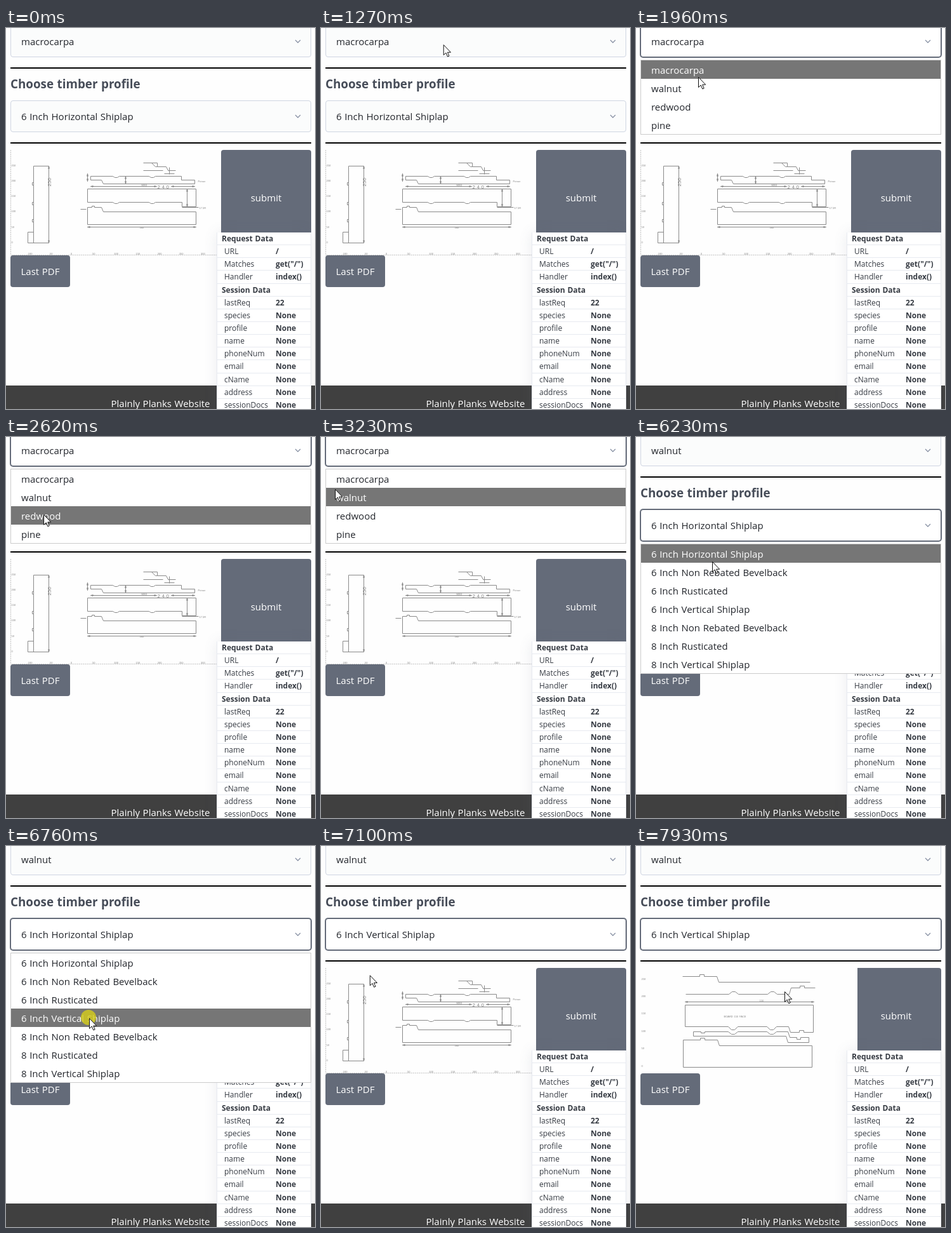
An HTML page that plays this animation: 487x600 px, repeating every 7.99 s.

```html
<!DOCTYPE html>
<html lang="en">
<head>
<meta charset="utf-8">
<title>Timber profile picker</title>
<style>
  html, body { margin: 0; width: 100%; height: 100%; overflow: hidden; background: #fefefe; }
  body { position: relative; font: 15px/30px "Open Sans", "Noto Sans", sans-serif; word-spacing: .7px; color: #23262c; }
  body > * { position: absolute; box-sizing: border-box; }
  .hidden { visibility: hidden; }
  hr { left: 7px; width: 474px; height: 2px; margin: 0; border: 0; background: #000; }
  h2 { left: 7px; top: 73px; margin: 0; font-size: 18.8px; color: #474d59; }

  .select { left: 7px; width: 474px; height: 50px; padding-left: 16px; line-height: 48px;
    border: 1px solid #cfd5e2; border-radius: 4px; background: #fbfcfc; }
  .select.focus { border-color: #646b79; box-shadow: 0 0 0 1px #646b79; background: #fff; }
  .select svg { position: absolute; right: 14px; top: 20px; fill: none; stroke: #8891a4; stroke-width: 1.3; }

  .menu { left: 7px; width: 474px; margin: 0; padding: 0; list-style: none; z-index: 3;
    border: 1px solid #ccc; background: #fff; }
  .menu li { height: 29px; padding-left: 16px; }
  .menu li.lit { background: #767676; color: #fff; }

  .button { border-radius: 4px; background: #646b79; color: #fff; text-align: center; }
  .drawing { left: 7px; top: 192px; height: 166px; fill: none; stroke: #8a8a8a; }
  .drawing text { fill: #808080; stroke: none; font: 4px "Liberation Sans", sans-serif; }
  .drawing .big { font-size: 8px; }
  .drawing .wide { letter-spacing: 2.5px; }

  .panel { left: 332px; top: 322px; width: 149px; z-index: 2; border: 1px solid #e7eaf0; border-top: 0; background: #fff;
    box-shadow: 0 0 20px rgba(90, 100, 120, .12); font-size: 12px; line-height: 20.15px; color: #373c44; }
  .panel div { box-sizing: border-box; height: 20.15px; padding-left: 11px; border-bottom: 1px solid #e7eaf0; display: flex; }
  .panel span { width: 81px; }
  .panel .head { padding-left: 7px; }

  footer { left: 0; top: 563px; width: 100%; height: 60px; line-height: 57px; text-align: center; background: #404040; color: #fff; }
  #press { left: -13px; top: -13px; width: 24px; height: 24px; border-radius: 50%; background: rgba(212, 204, 28, .82); z-index: 4; }
  #cursor { left: 0; top: 0; z-index: 5; overflow: visible; }
</style>
</head>
<body>
<div class="select" id="species" style="top:-4px"><span></span></div>
<hr style="top:62px">
<h2>Choose timber profile</h2>
<div class="select" id="profile" style="top:114px"><span></span></div>
<hr style="top:180px">

<div class="button" style="left:339px;top:192px;width:142px;height:150px;line-height:151px">submit</div>
<div class="button" style="left:7px;top:358px;width:94px;height:50px;line-height:51px">Last PDF</div>
<svg class="drawing" id="horizontal" width="326" viewBox="6.5 191.5 326 166"></svg>
<svg class="drawing" id="vertical" width="342" viewBox="6.5 191.5 342 166" style="background:#fefefe"></svg>

<div class="panel" id="panel"></div>
<footer>Plainly Planks Website</footer>
<ul class="menu" id="speciesMenu" style="top:50px"></ul>
<ul class="menu" id="profileMenu" style="top:168px"></ul>
<div id="press"></div>
<svg id="cursor" width="13" height="20">
  <path d="M.5 .5v16l3.700-3.500l2.600 6l2.400-1l-2.500-5.800h5z" fill="#fff" stroke="#111"/>
</svg>

<script>
const LOOP = 7990, ENTER = 600, REDRAW = 7780, ROW = 29;
const $ = id => document.getElementById(id);

const speciesNames = ['macrocarpa', 'walnut', 'redwood', 'pine'];
const profileNames = ['6 Inch Horizontal Shiplap', '6 Inch Non Rebated Bevelback', '6 Inch Rusticated',
  '6 Inch Vertical Shiplap', '8 Inch Non Rebated Bevelback', '8 Inch Rusticated', '8 Inch Vertical Shiplap'];

// Mouse presses; each takes effect on release
const presses = {
  openSpecies: { down: 1400, up: 1540 },
  pickSpecies: { down: 3890, up: 3960 },
  openProfile: { down: 5700, up: 5800 },
  pickProfile: { down: 6640, up: 6900 }
};

// Stops of the pointer: time, x, y
const stops = [
  [ENTER, 256, 0], [1400, 188, 28], [1960, 98, 77], [2500, 62, 125], [3230, 22, 82], [3890, 33, 95],
  [5090, 23, 13], [5700, 122, 139], [6230, 120, 196], [6430, 126, 281], [6690, 131, 271],
  [6900, 131, 271], [7350, 2, 110], [7930, 234, 229]
];

const ease = k => k * k * (3 - 2 * k);
const between = (t, a, b) => t >= a && t < b;
const show = (el, on) => el.classList.toggle('hidden', !on);
const place = (el, [x, y]) => { el.style.transform = `translate(${x}px, ${y}px)`; };

function pointerAt(t) {
  const i = stops.findIndex(stop => stop[0] > t);
  const [t1, x1, y1] = stops.at(i);
  if (i < 1) return [x1, y1];
  const [t0, x0, y0] = stops[i - 1];
  const k = ease((t - t0) / (t1 - t0));
  return [x0 + (x1 - x0) * k, y0 + (y1 - y0) * k];
}

function drawMenu(menu, open, y) {
  show(menu, open);
  const row = Math.max(0, Math.floor((y - menu.offsetTop - 1) / ROW));
  [...menu.children].forEach((item, i) => item.classList.toggle('lit', i === row));
}

function drawSelect(select, label, focused) {
  select.firstChild.textContent = label;
  select.classList.toggle('focus', focused);
}

function draw(t) {
  const { openSpecies, pickSpecies, openProfile, pickProfile } = presses;
  const pointer = pointerAt(t);
  place($('cursor'), pointer);
  place($('press'), pointer);
  show($('cursor'), t >= ENTER);
  show($('press'), Object.values(presses).some(p => between(t, p.down, p.up)));

  drawSelect($('species'), speciesNames[t < pickSpecies.up ? 0 : 1], between(t, openSpecies.down, openProfile.down));
  drawSelect($('profile'), profileNames[t < pickProfile.up ? 0 : 3], t >= openProfile.down);
  drawMenu($('speciesMenu'), between(t, openSpecies.up, pickSpecies.up), pointer[1]);
  drawMenu($('profileMenu'), between(t, openProfile.up, pickProfile.up), pointer[1]);
  show($('horizontal'), t < REDRAW);
  show($('vertical'), t >= REDRAW);
}

// Helpers for the plans
const line = d => `<path d="${d}"/>`;
const text = (x, y, s, cls = '') => `<text x="${x}" y="${y}" class="${cls}">${s}</text>`;
const range = (n, f) => Array.from({ length: n }, (_, i) => f(i)).join('');
const sideRuler = (y, gap) => range(6, i => text(8, y + i * gap, 250 - i * 50));
const groove = (slope, flat, depth) => `l${slope} ${depth}h${flat}l${slope} ${-depth}`;
const across = (x, y, w) => line(`M${x} ${y}h${w}m-4-1l4 1l-4 1M${x + 4} ${y - 1}l-4 1l4 1`);
const down = (x, y, h) => line(`M${x} ${y}v${h}m-1-4l1 4l1-4M${x - 1} ${y + 4}l1-4l1 4`);

function horizontalPlan() {
  const cut = groove(3, 4, 2);
  const cuts = lead => `h${lead}${cut}h47${cut}`;
  const nick = 'v-4h-2v-4h2';
  return sideRuler(217, 24.3) + range(9, i => text(33 + i * 34.2, 356, i * 50 - 100)) +
    '<path d="M7 192V357H333" stroke-dasharray="1 2"/>' +
    line(`M67 217H43V338M43 321H34V338H67M43 251${nick}M43 282${nick}M43 309${nick}`) + down(67, 217, 121) +
    '<g transform="translate(70 249) rotate(-90)">' + text(0, 0, 250, 'big') + '</g>' +
    line('M216 212h22v6h14l3 6h12M216 224h31M229 212l6 6h3M257 219v11M249 229h16') +
    line(`M133 233${cuts(35)}H276V239H297V245H153L150 239H133Z`) + down(188, 233, 12) + down(128, 229, 12) +
    across(133, 249, 104) + across(260, 249, 37) + text(238, 252, 240, 'big wide') +
    text(213, 248, 'MXD') + text(302, 242, 'Primer') +
    line(`M128 253V274${cuts(40)}H277V281H299V253Z`) + down(285, 253, 28) + line('M277 282h26') + text(304, 284, '17.5R') +
    line('M128 282h7v-2h4v2h11l3 7H299V309H128Z') + line('M117 285h9') +
    across(128, 313, 171) + text(210, 315, 260);
}

function verticalPlan() {
  const cuts = depth => `h68${groove(5, 5, depth)}h46${groove(5, 5, depth)}h19`;
  const ridge = 'h27v-3h7v3h20l3 9';
  return sideRuler(210, 27.4) +
    line(`M73 205${ridge}H274`) +
    line(`M78 233${cuts(-4)}l3-10h14v-3h7v3h17`) +
    across(77, 245, 203) + text(194, 244, 150) +
    line(`M77 250V284${cuts(5)}l3 9h14v-3h7v3H279V250Z`) + text(138, 269, 'BOARD 150 FACE') +
    line(`M90 292h12v2h6v-2h37${groove(5, 5, 4)}h46${groove(5, 5, 4)}h18l3 9h11v3h6v-3h13v8h-33l-3-10H90Z`) +
    line(`M74 305${ridge}H277V348H74Z`);
}

function build() {
  const items = names => names.map(n => `<li>${n}</li>`).join('');
  $('speciesMenu').innerHTML = items(speciesNames);
  $('profileMenu').innerHTML = items(profileNames);
  $('horizontal').innerHTML = horizontalPlan();
  $('vertical').innerHTML = verticalPlan();

  for (const select of document.querySelectorAll('.select'))
    select.insertAdjacentHTML('beforeend', '<svg width="12" height="8"><path d="M2 2l4 4l4-4"/></svg>');

  const row = (name, value) => `<div><span>${name}</span><b>${value}</b></div>`;
  const head = name => `<div class="head"><b>${name}</b></div>`;
  const empty = ['species', 'profile', 'name', 'phoneNum', 'email', 'cName', 'address', 'sessionDocs'];
  $('panel').innerHTML = head('Request Data') + row('URL', '/') + row('Matches', 'get("/")') +
    row('Handler', 'index()') + head('Session Data') + row('lastReq', 22) +
    empty.map(name => row(name, 'None')).join('');
}

build();
const start = performance.now();
function tick() {
  draw((performance.now() - start) % LOOP);
  requestAnimationFrame(tick);
}
tick();
</script>
</body>
</html>
```
